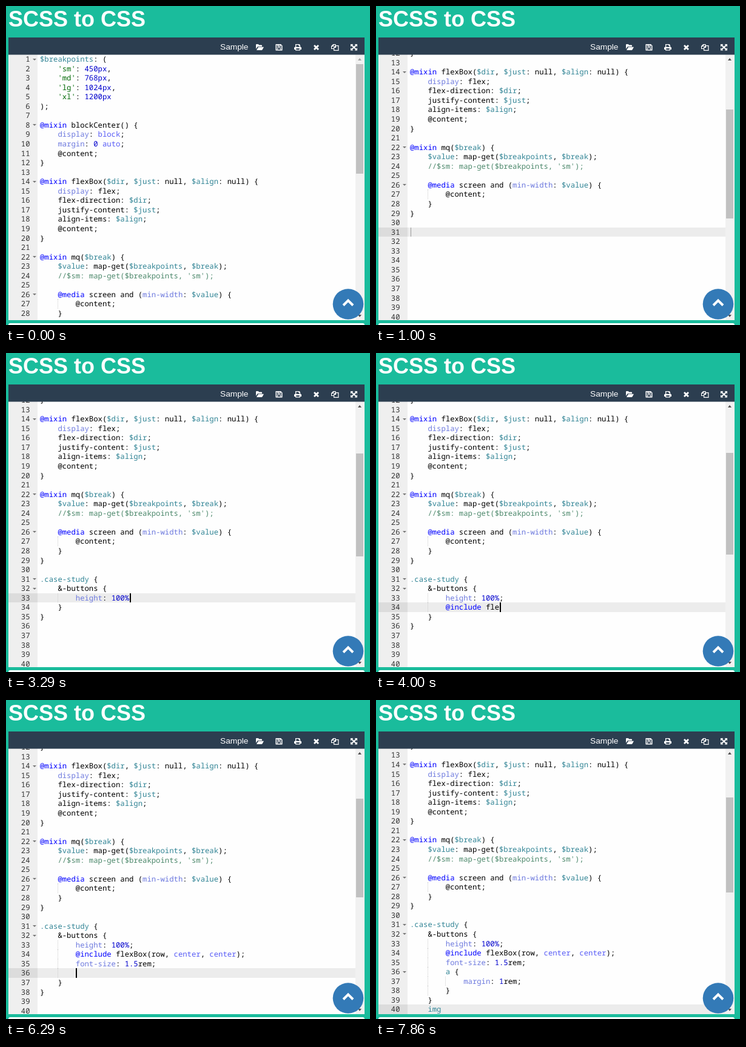
Recreate the animation shown at these times as an HTML page. Size 600x527 px, loop 8 s.

```html
<!DOCTYPE html>
<html lang="en">
<head>
<meta charset="utf-8">
<title>SCSS to CSS</title>
<style>
html, body { margin: 0; width: 100%; height: 100%; overflow: hidden; background: #1abc9c; }
#stage { position: relative; width: 600px; height: 527px; overflow: hidden; }
#stage svg { position: absolute; left: 0; top: 0; }
#editor {
  position: absolute; left: 4px; top: 80px; width: 587px; height: 439px; overflow: hidden;
  background: #fefefe; color: #000;
  font: 12.25px "Noto Sans Mono", monospace; text-rendering: geometricPrecision;
}
#editor * { position: absolute; }
#editor span span { position: static; }
#gutter { left: 0; top: 0; width: 48px; height: 100%; background: #efefef; }
.row { left: 0; width: 572px; height: 15.556px; line-height: 15.556px; white-space: pre; }
.active { background: #ececec; }
.active .num { background: #dcdcdc; }
.num { left: 0; width: 35.5px; padding-right: 12.5px; text-align: right; color: #333; height: 100%; }
.fold { left: 39.5px; top: 6.5px; border: 3px solid transparent; border-top-color: #777; border-bottom: 0; }
.code { left: 52px; top: 0; }
.guide { top: 0; height: 100%; border-left: 1px dotted #ccc; }
.caret { top: 0; height: 100%; width: 2px; background: #000; }
.idle { width: 1px; background: #999; }
.comment { color: #4c886b; }
.string { color: #036a07; }
.number { color: #0000cd; }
.variable { color: #318495; }
.keyword { color: #0000ff; }
.property { color: #6d79de; }
.constant { color: #585cf6; }
#track { left: 572px; top: 0; width: 15px; height: 100%; background: #f1f1f1; }
#thumb { left: 1px; width: 12px; background: #c1c1c1; }
.arrow { left: 4px; border: 3.5px solid transparent; }
#up { top: 6px; border-bottom: 4px solid; border-top: 0; }
#down { bottom: 5px; border-top: 4px solid #505050; border-bottom: 0; }
</style>
</head>
<body>
<div id="stage">
  <div id="editor">
    <div id="gutter"></div>
    <div id="rows"></div>
    <div id="track"><div id="up" class="arrow"></div><div id="thumb"></div><div id="down" class="arrow"></div></div>
  </div>
  <svg width="600" height="527" fill="#fff" font-family="'Liberation Sans', Arial, sans-serif">
    <text x="4" y="34" font-size="36" font-weight="bold">SCSS to CSS</text>
    <rect x="4" y="52" width="587" height="28.5" fill="#2c3e50"/>
    <text x="353" y="72" font-size="13.7">Sample</text>
    <!-- open, save, print, clear, copy, expand -->
    <path d="M412 71V64q0-1 1-1h3l1 1.500h4q1 0 1 1V67h-6.500q-1 0-1.500 1zM413 73l2.500-4.500q.4-.7 1.200-.7H425l-2.500 4.500q-.4.700-1.200.700z"/>
    <path fill-rule="evenodd" d="M444.500 63h8.500l2.500 2.500V73.500h-11zM446 64.500v7.500h1v-3.500h6v3.500h1v-6l-1.500-1.500v3h-5v-3zM449.500 64.500v2h1.500v-2zM448 69.500v2.500h4v-2.500z"/>
    <path fill-rule="evenodd" d="M477 63h6.500l1.500 1.500V67.500q2 0 2 1.500v3h-2v1.500h-8V72h-2v-3q0-1.500 2-1.500zM478.300 64.300v3.500h5.400v-2h-1.500v-1.500zM478.300 70v2.200h5.400V70z"/>
    <path d="M508 65l7 7M515 65l-7 7" stroke="#fff" stroke-width="2.800"/>
    <path d="M540.500 70.500H536.600V66.500L539.500 63.600H543V65.500M539.500 63.600V66.500H536.600M540.600 68.500L543.500 65.600H547.900V73.400H540.600ZM543.500 65.600V68.500H540.600" fill="none" stroke="#fff" stroke-width="1.200"/>
    <path d="M568 63h4.500l-4.500 4.500zM579 63v4.500l-4.500-4.500zM568 73.500v-4.500l4.500 4.500zM579 73.500h-4.500l4.500-4.500z"/>
    <path d="M570 65l7 6.500M577 65l-7 6.500" stroke="#fff" stroke-width="2"/>
    <path d="M4 530v-3q0-3 3-3h581q3 0 3 3v3z"/>
    <circle cx="564" cy="492.500" r="25.300" fill="#337ab7"/>
    <path d="M556 494.500l8-8 8 8" fill="none" stroke="#fff" stroke-width="4"/>
  </svg>
</div>
<script>
const LOOP = 8000, STEP = 1000 / 7;
const PITCH = 15.556, CHAR = 7.35, VIEW = 439;
const BLANK_TAIL = 33, REST_SCROLL = 181;

const intro = `$breakpoints: (
    'sm': 450px,
    'md': 768px,
    'lg': 1024px,
    'xl': 1200px
);

@mixin blockCenter() {
    display: block;
    margin: 0 auto;
    @content;
}

@mixin flexBox($dir, $just: null, $align: null) {
    display: flex;
    flex-direction: $dir;
    justify-content: $just;
    align-items: $align;
    @content;
}

@mixin mq($break) {
    $value: map-get($breakpoints, $break);
    //$sm: map-get($breakpoints, 'sm');

    @media screen and (min-width: $value) {
        @content;
    }
}
`.split('\n');

// Bursts of keystrokes: start, end, keys (↓ moves to the end of the next line).
const bursts = [
  [1050, 2420, '.case-study {\n&-buttons'],
  [2480, 3990, ' {\nheight: 100%;\n@include fle'],
  [4010, 5000, 'xBox(row, center, center);'],
  [5150, 6200, '\nfont-size: 1.5rem;\n'],
  [6300, 7650, 'a {\nmargin: 1rem;↓↓\nimg'],
];

const words = {};
const classify = (kind, list) => list.split(' ').forEach(word => words[word] = kind);
classify('keyword', '@mixin @media @include');
classify('property', 'display margin height font-size min-width');
classify('constant', 'block auto center');
classify('variable', 'a img');

const TOKEN = /(?<comment>\/\/.*)|(?<string>'[^']*')|(?<variable>\$[\w-]+|\.[a-z][\w-]*)|(?<number>\d+(?:\.\d+)?(?:px|%)?)|[@\w-]+|&/g;

function highlight(line) {
  return line.replace(TOKEN, (token, ...rest) => {
    const groups = rest.pop();
    const kind = Object.keys(groups).find(name => groups[name]) || words[token];
    const text = token === '&' ? '&amp;' : token;
    return kind ? `<span class="${kind}">${text}</span>` : text;
  });
}

function keysAt(time) {
  return bursts.map(([start, end, keys]) => {
    const progress = Math.min(1, Math.max(0, (time - start) / (end - start)));
    return keys.slice(0, Math.floor(progress * keys.length));
  }).join('');
}

// Replays keystrokes with bracket closing and automatic indentation.
function type(keys) {
  const closing = { '{': '}', '(': ')' };
  let before = '', after = '';
  for (const key of keys) {
    if (key === '↓') {
      const move = after.match(/^.*\n.*/)[0];
      before += move;
      after = after.slice(move.length);
    } else if (key === '\n') {
      const indent = '\n' + before.split('\n').pop().match(/^ */)[0];
      const opens = before.endsWith('{') && after[0] === '}';
      before += indent + (opens ? '    ' : '');
      if (opens) after = indent + after;
    } else {
      before += key;
      after = key === ')' && after[0] === ')' ? after.slice(1) : (closing[key] || '') + after;
    }
  }
  return { before, after };
}

function rowHtml(line, index, top, caret) {
  const indent = line.match(/^ */)[0].length;
  let html = `<span class="num">${index + 1}</span>`;
  if (/[{(]$/.test(line)) html += '<i class="fold"></i>';
  for (let col = 4; col < indent; col += 4)
    html += `<i class="guide" style="left:${51.5 + col * CHAR}px"></i>`;
  html += `<span class="code">${highlight(line)}</span>${caret}`;
  return `<div class="row${caret === null ? '' : ' active'}" style="top:${top}px">${html.replace(/null$/, '')}</div>`;
}

const byId = id => document.getElementById(id);

function draw(time) {
  const keys = keysAt(time);
  const { before, after } = type(keys);
  const head = before.split('\n');
  const lines = [...intro, ...(before + after).split('\n'), ...Array(BLANK_TAIL).fill('')];
  const activeIndex = intro.length + head.length - 1;

  const ramp = Math.min(1, Math.max(0, (time - 100) / 500));
  const scroll = ramp < 1 ? REST_SCROLL * ramp
    : Math.max(REST_SCROLL, (activeIndex + 1) * PITCH - VIEW);

  const caretLeft = 52.5 + head.at(-1).length * CHAR;
  const caret = time > 7800 ? ''
    : `<i class="caret${keys ? '' : ' idle'}" style="left:${caretLeft}px"></i>`;

  const first = Math.floor(scroll / PITCH);
  byId('rows').innerHTML = lines.slice(first, first + 30).map((line, i) => {
    const index = first + i;
    return rowHtml(line, index, index * PITCH - scroll, index === activeIndex ? caret : null);
  }).join('');

  const scale = 410 / (lines.length * PITCH);
  byId('thumb').style.top = 16 + scroll * scale + 'px';
  byId('thumb').style.height = VIEW * scale + 'px';
  byId('up').style.borderBottomColor = scroll ? '#505050' : '#a3a3a3';
}

let shown = -1;
function tick() {
  const step = Math.floor((performance.now() % LOOP + 4.9) / STEP) % 56;
  if (step !== shown) draw((shown = step) * STEP);
  requestAnimationFrame(tick);
}
tick();
</script>
</body>
</html>
```
